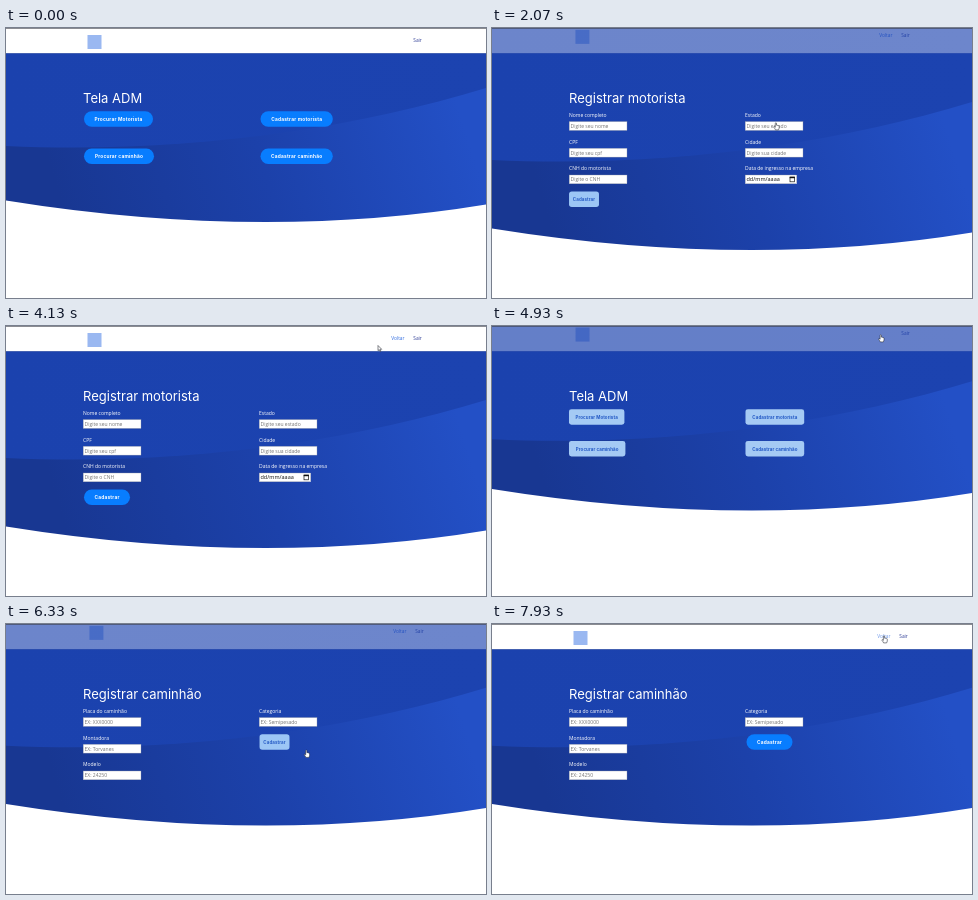
Animation, 480 px wide and 270 px high, one loop 8000 ms. Source, as an HTML page:

```html
<!DOCTYPE html>
<html lang="pt-BR">
<head>
<meta charset="utf-8">
<title>Tela ADM</title>
<style>
html, body { margin: 0; width: 100%; height: 100%; overflow: hidden; background: #fff; }
svg { display: block; width: 100%; height: 100%; }
text { font-family: "Open Sans", sans-serif; font-size: 5px; }
.title { font: 400 13px Inter, sans-serif; fill: #fff; }
.label { font-weight: 500; fill: #fff; }
.hint { fill: #757575; }
.date { font-size: 5.5px; fill: #111; }
.link { font-size: 4.8px; font-weight: 500; }
.btn text { font-family: Inter, sans-serif; font-weight: 700; text-anchor: middle; }
</style>
</head>
<body>
<svg id="stage" viewBox="0 0 480 270" preserveAspectRatio="none">
  <defs>
    <linearGradient id="low" gradientUnits="userSpaceOnUse" x1="60" y1="190" x2="450" y2="70">
      <stop offset="0" stop-color="#183792"/>
      <stop offset=".5" stop-color="#1c41aa"/>
      <stop offset="1" stop-color="#2350c6"/>
    </linearGradient>
    <linearGradient id="high" x1="0" y1="0" x2="1" y2="0">
      <stop offset="0" stop-color="#1b42ae"/>
      <stop offset="1" stop-color="#1c43b0"/>
    </linearGradient>
    <clipPath id="section"><path id="wave"/></clipPath>
  </defs>
  <rect width="480" height="270" fill="#fff"/>
  <g clip-path="url(#section)">
    <g id="backdrop">
      <rect y="-30" width="480" height="300" fill="url(#low)"/>
      <path d="M0 -30V118C170 126 340 103 480 60V-30Z" fill="url(#high)"/>
    </g>
  </g>
  <g id="pages"></g>
  <g id="header">
    <rect width="480" height="25.2" fill="#fff"/>
    <rect y="25.2" width="480" height=".6" fill="#000" opacity=".12"/>
    <g id="menu">
      <rect x="81.500" y="7" width="14" height="14" fill="#9ab8f1"/>
      <text id="back" class="link" x="385.300" y="14.400" fill="#2f6be0">Voltar</text>
      <text class="link" x="407.300" y="14.400" fill="#2b3a94">Sair</text>
    </g>
  </g>
  <rect width="480" height=".8" fill="#3c3f48" opacity=".75"/>
  <g id="cursor" stroke="#20242c" stroke-width=".55" stroke-linejoin="round" fill="#fff">
    <path id="arrow" d="M0 0V5.200L1.200 4.100L2 6L2.900 5.600L2.100 3.800H3.700Z"/>
    <path id="hand" d="M-.6 .6Q0 -.4 .6 .6V2.700Q1.200 2.200 1.600 2.900Q2.200 2.500 2.500 3.200Q3.200 2.900 3.300 3.800V5.300Q3.200 6.400 2.600 7.400H-.4Q-.9 6.200 -2 4.900Q-2.200 3.900 -1.300 4.200L-.6 4.800Z"/>
  </g>
</svg>
<script>
const LOOP = 8000, LOAD = 620, HOVER = 300;
const $ = id => document.getElementById(id);

function add(parent, tag, attrs, text) {
  const el = document.createElementNS("http://www.w3.org/2000/svg", tag);
  set(el, attrs);
  if (text) el.textContent = text;
  return parent.appendChild(el);
}
function set(el, attrs) {
  for (const k in attrs) el.setAttribute(k, attrs[k]);
}

const clamp = v => Math.max(0, Math.min(1, v));
const lerp = (a, b, p) => a + (b - a) * p;
const mix = (a, b, p) => `rgb(${a.map((v, i) => Math.round(lerp(v, b[i], p)))})`;
const smooth = p => p * p * (3 - 2 * p);

// The CSS "ease" curve, cubic-bezier(.25, .1, .25, 1)
function ease(x) {
  x = clamp(x);
  const curve = (a, b, s) => 3 * a * s * (1 - s) ** 2 + 3 * b * s * s * (1 - s) + s ** 3;
  let lo = 0, hi = 1;
  for (let i = 0; i < 20; i++) {
    const mid = (lo + hi) / 2;
    if (curve(.25, .25, mid) < x) lo = mid; else hi = mid;
  }
  return curve(.1, 1, lo);
}

function page(title) {
  const g = add($("pages"), "g", {});
  add(g, "text", { class: "title", x: 77, y: 74.5 }, title);
  return { g, buttons: [], extra: 0, give: 0, back: true };
}

function button(pg, x, y, w, label, grow, drop = 0) {
  const g = add(pg.g, "g", { class: "btn" });
  pg.buttons.push({ x, y, w, grow, drop, rect: add(g, "rect", {}), text: add(g, "text", {}, label) });
}

function field(pg, col, row, label, hint) {
  const x = col ? 253 : 77, y = 93.6 + row * 26.7;
  add(pg.g, "text", { class: "label", x, y: y - 4.6 }, label);
  const date = hint.startsWith("dd");
  add(pg.g, "rect", { x: x + .2, y, width: date ? 51.6 : 57.8, height: 8.8, fill: "#fff", stroke: "#8d93a3", "stroke-width": .35 });
  add(pg.g, "text", { class: date ? "date" : "hint", x: x + 1.5, y: y + 6.2 }, hint);
  if (date) {
    add(pg.g, "rect", { x: 298, y: y + 2.2, width: 4.6, height: 4.6, fill: "none", stroke: "#111", "stroke-width": .7 });
    add(pg.g, "rect", { x: 297.7, y: y + 1.7, width: 5.2, height: 1.5, fill: "#111" });
  }
}

const admin = page("Tela ADM");
admin.back = false;
admin.give = 14;
button(admin, 78, 83.3, 69, "Procurar Motorista", 20);
button(admin, 254.5, 83.3, 72.3, "Cadastrar motorista", 20);
button(admin, 78, 120.5, 70, "Procurar caminhão", 20, 8);
button(admin, 254.5, 120.5, 72.3, "Cadastrar caminhão", 20, 8);

const driver = page("Registrar motorista");
driver.extra = 28;
field(driver, 0, 0, "Nome completo", "Digite seu nome");
field(driver, 0, 1, "CPF", "Digite seu cpf");
field(driver, 0, 2, "CNH do motorista", "Digite o CNH");
field(driver, 1, 0, "Estado", "Digite seu estado");
field(driver, 1, 1, "Cidade", "Digite sua cidade");
field(driver, 1, 2, "Data de ingresso na empresa", "dd/mm/aaaa");
button(driver, 78, 163.4, 46, "Cadastrar", 25);

const truck = page("Registrar caminhão");
truck.extra = 7.5;
field(truck, 0, 0, "Placa do caminhão", "EX: XXX0000");
field(truck, 0, 1, "Montadora", "EX: Torvanes");
field(truck, 0, 2, "Modelo", "EX: 24250");
field(truck, 1, 0, "Categoria", "EX: Semipesado");
button(truck, 254.5, 110.2, 46, "Cadastrar", 25);

const visits = [
  { at: -LOAD, page: admin, hover: 1, from: 1180 },
  { at: 1930, page: driver },
  { at: 4800, page: admin, hover: 3, from: 5780 },
  { at: 6190, page: truck }
];

// Pointer stops: time, x, y
const stops = [
  [870, 310, 57], [1400, 283.8, 94.5], [2050, 283.8, 94.5], [2300, 288.3, 93.5],
  [2750, 288.3, 93.5], [3500, 372, 19.5], [4130, 372, 19.5], [4330, 388.7, 8.5],
  [5250, 388.7, 8.5], [5900, 300.3, 126], [6340, 300.3, 126], [6530, 318, 112],
  [6870, 346, 82], [7070, 346, 82], [7750, 392, 11.5]
];
const handTimes = [[1180, 2400], [4230, 5310], [5780, 6370], [7620, LOOP]];
const linkTimes = [[4230, 4800], [7620, LOOP]];
const within = (spans, t) => spans.some(([a, b]) => t >= a && t < b);

function drawButton(b, p, hover) {
  const q = 1 - p, x = b.x - 1.5 * q, y = b.y - b.drop * q, w = b.w - b.grow * q;
  set(b.rect, {
    x, y, width: w, height: 15.5, rx: 7.75 * p,
    fill: mix([239, 239, 239], [8, 125, 255], p), "fill-opacity": 1 - hover,
    stroke: "#fff", "stroke-width": .9, "stroke-opacity": hover
  });
  set(b.text, {
    x: x + w / 2, y: y + 9.5, fill: mix([10, 70, 190], [255, 255, 255], p * p),
    style: `font-size:${lerp(4.3, 4.8, p)}px;letter-spacing:${.22 * p}px`
  });
}

function drawCursor(t) {
  const i = stops.findIndex(s => s[0] > t);
  const b = stops[i < 0 ? stops.length - 1 : i], a = i > 0 ? stops[i - 1] : b;
  const p = a === b ? 1 : smooth((t - a[0]) / (b[0] - a[0]));
  const hand = within(handTimes, t);
  set($("cursor"), {
    transform: `translate(${lerp(a[1], b[1], p)} ${lerp(a[2], b[2], p)})`,
    visibility: t < stops[0][0] ? "hidden" : "visible"
  });
  set($("hand"), { display: hand ? "inline" : "none" });
  set($("arrow"), { display: hand ? "none" : "inline" });
}

function draw(t) {
  const visit = visits.filter(v => v.at <= t).pop(), pg = visit.page;
  const p = ease((t - visit.at) / LOAD), q = 1 - p;

  const h = pg.extra - pg.give * q;
  set($("wave"), { d: `M0 0V${172.5 + h}Q255 ${213.5 + h} 480 ${176.5 + h}V0Z` });
  set($("backdrop"), { transform: `translate(0 ${h / 2})` });

  for (const other of [admin, driver, truck]) set(other.g, { display: other === pg ? "inline" : "none" });
  pg.buttons.forEach((b, i) => {
    drawButton(b, p, i === visit.hover ? ease((t - visit.from) / HOVER) : 0);
  });

  set($("header"), { opacity: p });
  set($("menu"), { transform: `translate(${3 * q} ${-8 * q})` });
  set($("back"), { display: pg.back ? "inline" : "none", opacity: within(linkTimes, t) ? .7 : 1 });
  drawCursor(t);
}

const begin = performance.now();
function tick() {
  draw((performance.now() - begin) % LOOP);
  requestAnimationFrame(tick);
}
tick();
</script>
</body>
</html>
```
